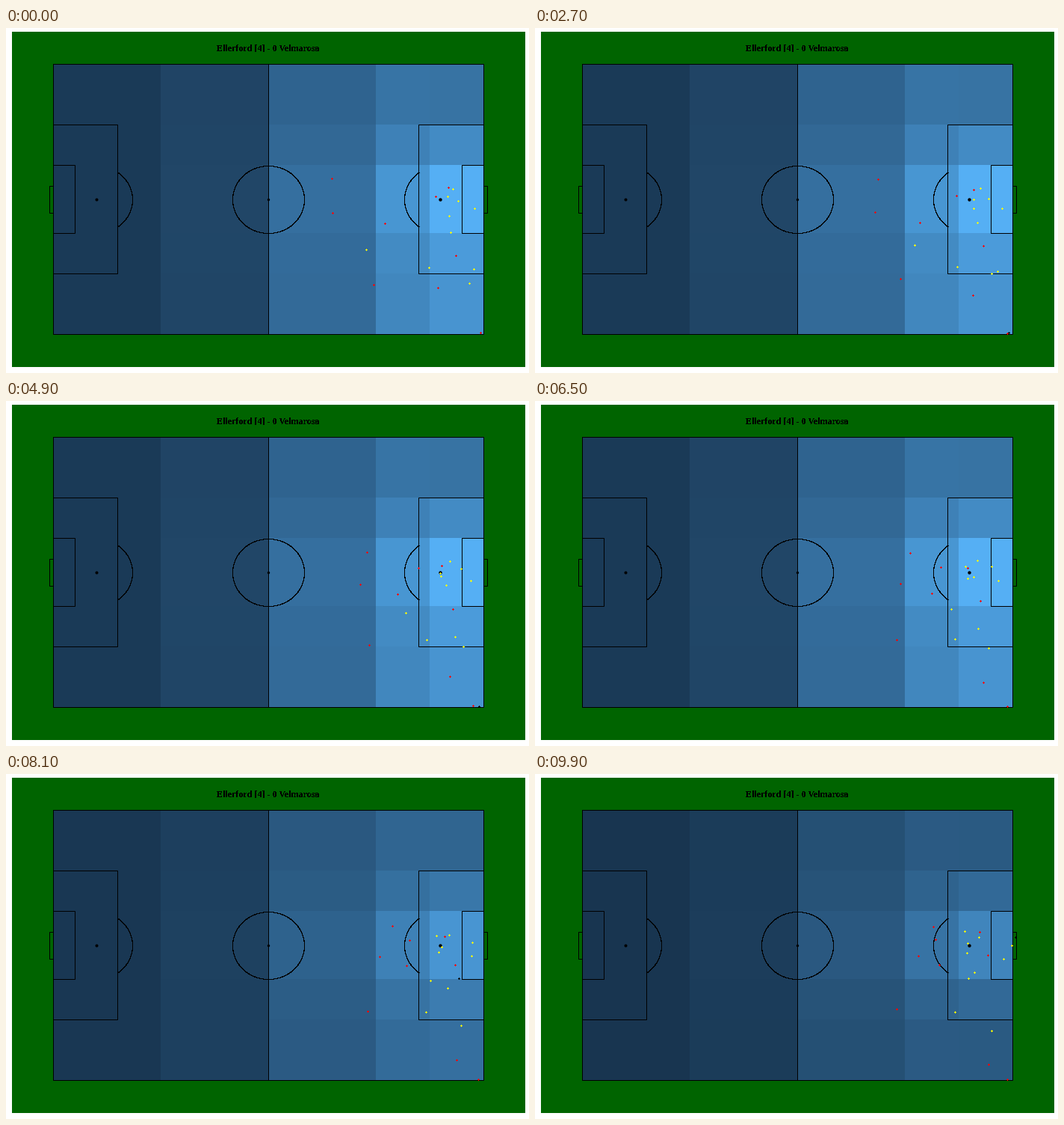
Recreate the animation shown at these times as a matplotlib script. Size 700 px wide and 461 px high, loop 10 s.

```python
import matplotlib.pyplot as plt
import numpy as np
from matplotlib.animation import FuncAnimation
from matplotlib.collections import PolyCollection
from matplotlib.colors import to_rgb
from matplotlib.patches import Arc, Ellipse, Rectangle

W, H, DPI = 700, 461, 64
PX = 72 / DPI  # one pixel in points
FRAMES, STEP = 100, 100
KICK, END = 6500, 9900

# Zone edges, each zone's depth along the pitch and row from the middle
COLS = np.array([63, 207, 351, 495, 567, 640])
ROWS = np.array([48, 129, 183, 274, 328, 410])
DEPTH = ((COLS[:-1] + COLS[1:]) / 2 - 63) / 576
SIDE = np.arange(-2, 3)[:, None]
BASE = [0.11, 0.19, 0.42, 0.54, 0.53]
LOW, HIGH = (np.array(to_rgb(c)) for c in ("#132b43", "#56b1f7"))

# Each player's place at the start, at the kick and at the end
ATTACK = [
    [(436, 201), (502, 203), (533, 204)],
    [(437, 247), (489, 244), (513, 243)],
    [(507, 261), (531, 257), (541, 255)],
    [(492, 343), (484, 319), (484, 314)],
    [(592, 213), (579, 223), (595, 211)],
    [(575, 225), (543, 222), (536, 221)],
    [(602, 304), (596, 267), (606, 242)],
    [(578, 347), (600, 376), (607, 388)],
]
DEFENCE = [
    [(598, 215), (592, 213), (594, 218)],
    [(605, 231), (611, 221), (638, 229)],
    [(627, 241), (620, 240), (627, 247)],
    [(591, 225), (579, 237), (578, 239)],
    [(593, 251), (576, 221), (575, 210)],
    [(595, 273), (587, 235), (579, 226)],
    [(482, 296), (557, 278), (580, 273)],
    [(566, 320), (562, 318), (562, 318)],
    [(620, 341), (593, 304), (588, 265)],
    [(626, 322), (607, 330), (611, 343)],
]
# Time, x, y
TAKER = [(0, 635, 407), (1600, 639, 409), (4300, 623, 406), (KICK, 632, 408)]
BALL = [(0, 635, 407), (KICK, 632, 408), (8100, 606, 273),
        (8400, 601, 250), (9100, 643, 218)]


def heat(t):
    """Zone colours: deeper and more central is brighter, fading after the kick."""
    fade = [7700, 8100, END]
    level = np.interp(t, fade, [1, 0.8, 0.65])
    lean = np.interp(t, fade, [0.25, 0.08, 0])
    lift = 0.33 * np.exp(-SIDE**2) + lean * (SIDE + 2) / 4
    value = level * np.array(BASE) + lift * (DEPTH / DEPTH[-1])**4
    return LOW + np.clip(value, 0, 1)[..., None] * (HIGH - LOW)


def run(team, t):
    """Ease into the first leg, then a straight run to the end."""
    start, kick, end = np.swapaxes(np.array(team, float), 0, 1)
    if t < KICK:
        return start + (kick - start) * (t / KICK)**1.2
    return kick + (end - kick) * (t - KICK) / (END - KICK)


def along(keys, t):
    times, xs, ys = zip(*keys)
    return np.array([[np.interp(t, times, xs), np.interp(t, times, ys)]])


fig = plt.figure(figsize=(W / DPI, H / DPI), dpi=DPI, facecolor="white")
ax = fig.add_axes([0, 0, 1, 1])
ax.set(xlim=(0, W), ylim=(H, 0))
ax.axis("off")

ax.add_patch(Rectangle((8, 5), 687, 448, color="#006400", lw=0))
mesh = ax.pcolormesh(COLS, ROWS, heat(0), shading="flat", zorder=1)
ax.text(351, 31, "Ellerford [4] - 0 Velmarosa", ha="center", va="baseline",
        family="Liberation Serif", weight="bold", size=12 * PX,
        antialiased=False)


def line(xs, ys):
    # Whole coordinates snap to the centre of their pixel
    ax.plot(xs, ys, color="black", lw=PX, solid_capstyle="projecting",
            solid_joinstyle="miter", snap=True, zorder=2)


def box(x0, y0, x1, y1):
    line([x0, x1, x1, x0, x0], [y0, y0, y1, y1, y0])


def arc(x, a0, a1):
    # Without antialiasing every touched pixel is filled, so keep it thin
    ax.add_patch(Arc((x + 0.5, 229.5), 96, 90, theta1=a0, theta2=a1,
                     lw=0.1 * PX, color="black", antialiased=False, zorder=2))


def spot(x, size):
    ax.add_patch(Ellipse((x + 0.5, 229.5), size, size, color="black",
                         lw=0, zorder=4))


box(63, 48, 639, 409)
line([351, 351], [48, 409])
for near, area, small, net in ((63, 149, 92, 58), (639, 552, 610, 644)):
    box(near, 129, area, 328)
    box(near, 183, small, 274)
    box(near, 211, net, 247)
arc(351, 0, 360)
arc(121, -52, 52)
arc(581, 128, 232)
spot(121, 4)
spot(351, 3.4)
spot(581, 4.4)

# Outline of a plus sign three pixels wide around pixel (0, 0)
PLUS = np.array([(0, -1), (1, -1), (1, 0), (2, 0), (2, 1), (1, 1),
                 (1, 2), (0, 2), (0, 1), (-1, 1), (-1, 0), (0, 0)])


def dots(color, z):
    return ax.add_collection(
        PolyCollection([], facecolors=color, linewidths=0, zorder=z),
        autolim=False)


def place(marks, xy):
    marks.set_verts(np.floor(xy + 0.5)[:, None] + PLUS)


ball, attack, defence = dots("black", 5), dots("#ff0000", 6), dots("#ffff00", 6)


def update(i):
    t = i * STEP
    mesh.set_array(heat(t))
    place(ball, along(BALL, t))
    place(attack, np.vstack([run(ATTACK, t), along(TAKER, t)]))
    place(defence, run(DEFENCE, t))
    return mesh, ball, attack, defence


anim = FuncAnimation(fig, update, frames=FRAMES, interval=STEP,
                     repeat=True, repeat_delay=0, blit=False)
plt.show()
```
